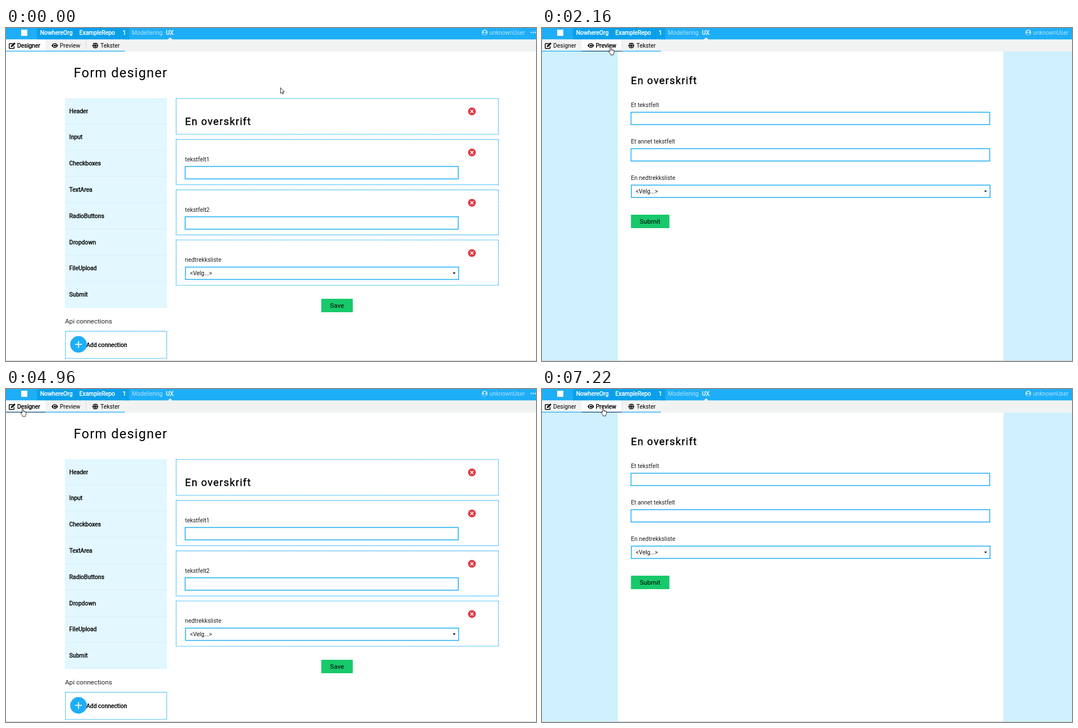
Recreate the animation shown at these times as an HTML page. Size 943 by 594 pixels, loop 8000 ms.

```html
<!DOCTYPE html>
<html lang="nb">
<head>
<meta charset="utf-8">
<title>Form designer</title>
<style>
html, body { margin: 0; width: 943px; height: 594px; overflow: hidden; background: #fff; }
svg { display: block; font-family: Roboto, Arial, sans-serif; }
text { white-space: pre; }
.bold { stroke: currentColor; stroke-width: .4px; }
.title { letter-spacing: 1.3px; }
</style>
</head>
<body>
<svg id="stage" width="943" height="594" viewBox="0 0 943 594"></svg>
<script>
const BLUE = '#1eaef7', GREEN = '#17c96b', INK = '#000';

// Drawing helpers return SVG markup
const rect = (x, y, w, h, fill, more = '') =>
  `<rect x="${x}" y="${y}" width="${w}" height="${h}" fill="${fill}" ${more}/>`;
const path = (d, fill, more = '') => `<path d="${d}" fill="${fill}" ${more}/>`;
const text = (x, y, s, { size = 10.4, fill = INK, cls = '', more = '' } = {}) =>
  `<text x="${x}" y="${y}" font-size="${size}" fill="${fill}" color="${fill}" class="${cls}" ${more}>${s.replace(/</g, '&lt;')}</text>`;
const group = (id, content) => `<g id="${id}">${content}</g>`;
const outline = (x, y, w, h) => rect(x, y, w, h, '#fff', `stroke="${BLUE}" stroke-width="1.5"`);
const dotted = (x, y, w, h) =>
  rect(x, y, w, h, 'none', `stroke="${BLUE}" stroke-width="1.4" stroke-dasharray="1.5 1.1"`);
const heading = (x, y) => text(x, y, 'En overskrift', { size: 18.2, cls: 'bold title' });
const label = (x, y, s) => text(x, y, s, { fill: '#222' });
const button = (x, y, w, s) =>
  rect(x, y, w, 24, GREEN) + text(x + 15.5, y + 16.1, s, { size: 11.7 });
const select = (x, y, w) =>
  outline(x, y, w, 22) + text(x + 8, y + 14.4, '<Velg...>', { fill: '#111' }) +
  path(`M${x + w - 10.5} ${y + 9.6}h5l-2.5 2.8z`, INK);
const remove = y =>
  `<circle cx="829" cy="${y}" r="7" fill="#dd3c47"/>` +
  path(`M826.3 ${y - 2.7}l5.4 5.4m0-5.4l-5.4 5.4`, 'none', 'stroke="#fff" stroke-width="1.4"');

const icons = {
  Designer: path('M12 27.8H6.6q-.9 0-.9.9v6.9q0 .9.9.9h6.9q.9 0 .9-.9v-3.4', 'none', `stroke="${INK}" stroke-width="1.4"`) +
    path('M8.6 34l.4-2.6 5.2-5.1q.6-.5 1.2 0l1 1q.5.6 0 1.2l-5.2 5.1z', INK),
  Preview: path('M81 31.2q5.8-8.6 11.6 0q-5.8 8.6-11.6 0z', INK) +
    '<circle cx="86.8" cy="31.2" r="2.9" fill="#fff"/><circle cx="87" cy="31.3" r="1.9"/>',
  Tekster: '<circle cx="158.9" cy="31.4" r="5.1"/>' +
    path('M153.8 29.6h10.2m-10.2 3.6h10.2M158.9 26.3c-3 3-3 7.2 0 10.2c3-3 3-7.2 0-10.2z', 'none', 'stroke="#f1f3f3" stroke-width=".7"')
};

const tabs = [
  { name: 'Designer', x: 0, w: 70.5, tx: 20 },
  { name: 'Preview', x: 70.5, w: 72, tx: 95.8 },
  { name: 'Tekster', x: 142.5, w: 69, tx: 168 }
];

const header = () => {
  const white = { fill: '#fff', cls: 'bold' }, pale = { fill: '#b0e2fc' };
  return rect(0, 0, 943, 20.6, BLUE) + rect(55, 0, 164.5, 20.6, '#0ba0ec') +
    rect(123.7, 0, .8, 20.6, '#0994dd') + rect(201, 0, .8, 20.6, '#0994dd') +
    rect(27, 3, 11, 11, '#fff') +
    text(60.8, 11.7, 'NowhereOrg', white) + text(130.6, 11.7, 'ExampleRepo', white) +
    text(207.6, 11.7, '1', white) + text(224, 11.7, 'Modellering', pale) +
    text(284.8, 11.7, 'UX', white) + path('M287.5 20.7l4.5-4 4.5 4z', '#f1f3f3') +
    group('user', '<circle cx="851.7" cy="8" r="5.2" fill="#b0e2fc"/>' +
      `<circle cx="851.7" cy="6.4" r="1.9" fill="${BLUE}"/>` +
      path('M848.4 11.3q.4-2.2 3.3-2.2t3.3 2.2q-3.3 2.6-6.6 0z', BLUE) +
      text(860.2, 11.7, 'unknownUser', pale) +
      [934.5, 938.3, 942.1].map(x => `<circle cx="${x}" cy="8" r="1.4" fill="#b0e2fc"/>`).join('')) +
    rect(0, 20.6, 943, 21.4, '#f1f3f3');
};

const tabBar = () => tabs.map(({ name, x, w, tx }) =>
  rect(x, 20.6, w, 20.2, '#f1f3f3', `id="bg${name}"`) +
  rect(x, 40.7, w, 1.3, BLUE, `id="line${name}"`) +
  icons[name] + text(tx, 35, name, { more: `id="text${name}"` })).join('') +
  rect(142, 20.6, .8, 20, '#d5d9da');

const designer = () => {
  const parts = ['Header', 'Input', 'Checkboxes', 'TextArea', 'RadioButtons', 'Dropdown', 'FileUpload', 'Submit'];
  const list = parts.map((s, i) =>
    text(112.6, 151.6 + 46.8 * i, s, { cls: 'bold' }) +
    rect(105, 170.8 + 46.8 * i, 181.5, .8, '#d3eff9')).join('');
  const boxes = [[125.6, 64], [198.7, 80.8], [288.7, 80.6], [378.1, 80.8]]
    .map(([y, h]) => dotted(302.7, y, 573.6, h)).join('');
  return text(120.5, 88, 'Form designer', { size: 23.4, cls: 'title' }) +
    rect(105, 125, 181.5, 374, '#e2f7ff') + list + boxes +
    [148.7, 222, 311.8, 401.4].map(remove).join('') +
    heading(318.5, 172.6) +
    label(318.5, 238, 'tekstfelt1') + outline(318.7, 247, 486, 22.2) +
    label(318.5, 327.6, 'tekstfelt2') + outline(318.7, 336.7, 486, 22.2) +
    label(318.5, 417.2, 'nedtrekksliste') + select(319.4, 426.5, 486) +
    button(561, 483, 56, 'Save') +
    text(105, 527, 'Api connections', { size: 11.7, fill: '#222' }) +
    dotted(105.7, 541, 180.2, 48.4) +
    `<circle cx="129" cy="564.4" r="14.8" fill="${BLUE}"/>` +
    path('M123 564.4h12m-6-6v12', 'none', 'stroke="#fff" stroke-width="1.7"') +
    text(143, 569, 'Add connection', { cls: 'bold' });
};

const preview = () =>
  rect(0, 42, 943, 551, '#cff0ff') + rect(135, 42, 686, 551, '#fff') +
  heading(158.3, 100.4) +
  label(158.3, 141.2, 'Et tekstfelt') + outline(158.4, 150.3, 638.2, 22) +
  label(158.3, 206.2, 'Et annet tekstfelt') + outline(158.4, 215.3, 638.2, 22) +
  label(158.3, 271.2, 'En nedtrekksliste') + select(159, 280.3, 638.2) +
  button(158.3, 333, 68.4, 'Submit');

const pen = 'stroke="#000" stroke-width=".8" stroke-linejoin="round"';
const arrow = path('M.4.5v10.2l2.4-2.2 1.6 3.4 1.6-.8-1.6-3.2h3z', '#fff', `id="arrow" ${pen}`);
const hand = group('hand',
  path('M3 9V1.7a1.1 1.1 0 0 1 2.2 0V5.5l4 .9q1.4.4 1.3 1.8l-.6 4-.9 1.4V15H4v-1.3L.8 9.6q-.3-1.6 1-1.4z', '#fff', pen) +
  path('M5.2 5.5v2m1.9-1.5v1.7m1.8-1.2v1.5', 'none', 'stroke="#000" stroke-width=".5"'));

const $ = id => document.getElementById(id);
$('stage').innerHTML = header() + tabBar() + group('viewDesigner', designer()) +
  group('viewPreview', preview()) + rect(0, 593, 943, 1, '#c9ced1') +
  group('cursor', arrow + hand);

// time, pointer x, pointer y, hovered tab, active tab, visible page
const D = 'Designer', P = 'Preview';
const steps = [
  [0, 488, 106, '', D, D],
  [740, 477, 104, '', D, D],
  [890, 356, 101, '', D, D],
  [1070, 201, 68, '', D, D],
  [1220, 150, 47, '', D, D],
  [1380, 126, 37, P, D, D],
  [1530, 118, 35, P, D, D],
  [1690, 118, 33, P, D, D],
  [2160, 118, 33, P, P, P],
  [3660, 105, 35, P, P, P],
  [3770, 76, 35, P, P, P],
  [3880, 50, 34, D, P, P],
  [4040, 25, 35, D, P, P],
  [4200, 25.5, 34, D, P, P],
  [4810, 25.5, 34, D, D, P],
  [4960, 25.5, 34, D, D, D],
  [5890, 63, 32, D, D, D],
  [6050, 88, 32, P, D, D],
  [6190, 103, 34, P, D, D],
  [6570, 104.5, 33, P, D, D],
  [7220, 104.5, 33, P, P, P]
];

const show = (id, on) => $(id).setAttribute('display', on ? 'inline' : 'none');

function draw(now) {
  const t = now % 8000;
  const [, x, y, hover, active, page] = steps.findLast(s => s[0] <= t);
  for (const { name } of tabs) {
    const on = name === active, over = name === hover;
    $('bg' + name).setAttribute('fill', on ? '#fff' : over ? '#c9cccd' : '#f1f3f3');
    $('line' + name).setAttribute('fill', over ? '#0b4a78' : BLUE);
    $('text' + name).setAttribute('class', on ? 'bold' : '');
  }
  show('viewDesigner', page === D);
  show('viewPreview', page === P);
  show('arrow', !hover);
  show('hand', hover);
  $('user').setAttribute('transform', `translate(${page === P ? 13.5 : 0} 0)`);
  $('cursor').setAttribute('transform', `translate(${x} ${y})`);
}

const start = performance.now();
(function loop() {
  draw(performance.now() - start);
  requestAnimationFrame(loop);
})();
</script>
</body>
</html>
```
